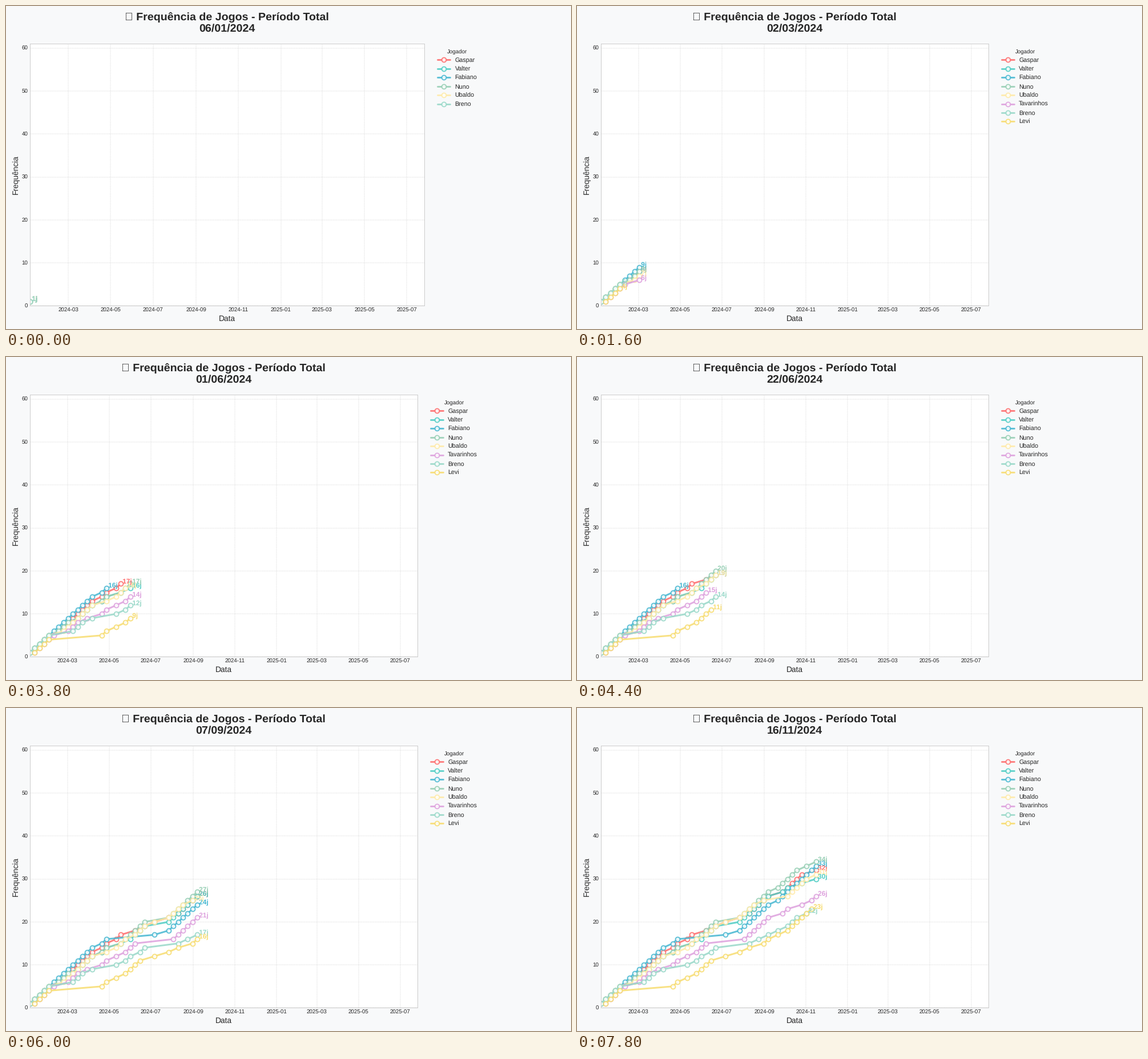
A matplotlib script that plays this animation: 990 by 566 pixels, repeating every 8 s.

```python
import numpy as np
import matplotlib.pyplot as plt
from matplotlib.animation import FuncAnimation

W, H, DPI = 990, 566, 70.71
INK, RULE, PAPER = "0.15", "0.8", "#f8f9fa"

plt.rcParams.update({
    "font.family": ["Liberation Sans"],
    "font.size": 10,
    "text.color": INK,
    "text.hinting": "none",
    "axes.labelcolor": INK,
    "axes.edgecolor": RULE,
    "axes.linewidth": 1,
    "axes.axisbelow": True,
    "xtick.color": INK,
    "ytick.color": INK,
    "xtick.major.size": 0,
    "ytick.major.size": 0,
    "lines.solid_capstyle": "round",
})

# Saturdays with a game, as days since the first one
START = np.datetime64("2024-01-06")
IDLE_WEEKS = {14, 17, 25, 27, 28, 36}
DAYS = np.array([7 * w for w in range(46) if w not in IDLE_WEEKS])
SPAN = 567

# name, colour, sessions missed
PLAYERS = [
    ("Gaspar", "#FF6B6B", [5, 18, 19, 21, 25, 31, 37, 38]),
    ("Valter", "#4ECDC4", [5, 9, 16, 18, 23, 31, 34, 35, 37, 38]),
    ("Fabiano", "#45B7D1", range(16, 23)),
    ("Nuno", "#96CEB4", [5, 9, 16, 23, 36, 38]),
    ("Ubaldo", "#FFEAA7", [5, 6, 14, 19, 28, 30, 31, 32, 38]),
    ("Tavarinhos", "#DDA0DD",
     [0, 6, 7, 11, 13, 17, 21, 22, 23, 24, 31, 34, 35, 37]),
    ("Breno", "#98D8C8",
     [5, 6, 7, 8, 12, 14, 15, 17, 20, 23, 24, 25, 27, 29, 32, 36, 38, 39]),
    ("Levi", "#F7DC6F", [0, *range(5, 14), 17, 22, 25, 27, 28, 32, 39]),
]

fig = plt.figure(figsize=((W + 0.01) / DPI, (H + 0.01) / DPI), dpi=DPI,
                 facecolor=PAPER)
ax = fig.add_axes([0, 0, 1, 1], facecolor="white")


def place(right):
    left, top, bottom = 41.9, 66, 525.5
    ax.set_position([left / W, 1 - bottom / H,
                     (right - left) / W, (bottom - top) / H])


def style_axes():
    months = np.arange("2024-03", "2025-08", 2, dtype="datetime64[M]")
    ticks = (months.astype("datetime64[D]") - START).astype(int)
    ax.set_xticks(ticks, [str(m) for m in months])
    ax.set_yticks(range(0, 61, 10))
    ax.set_xlim(0, SPAN)
    ax.set_ylim(0, 61)
    ax.grid(True, linestyle="--", linewidth=0.5, color=RULE)
    ax.set_xlabel("Data", fontsize=14)
    ax.set_ylabel("Frequência", fontsize=14)


def make_legend(handles):
    return ax.legend(handles=handles, title="Jogador", fontsize=11,
                     title_fontsize=10, loc="upper left", labelspacing=0.48,
                     bbox_to_anchor=(1.02, 1), frameon=False)


style_axes()
title = ax.set_title("", fontsize=20, fontweight="bold", pad=21)

lines, tags, played = [], [], []
for name, color, missed in PLAYERS:
    line, = ax.plot([], [], "o-", color=color, label=name, lw=3, ms=8,
                    mfc="white", mew=2, alpha=0.85)
    lines.append(line)
    tags.append(ax.text(0, 0, "", color=color, fontsize=12,
                        fontweight="bold"))
    played.append(np.array([i for i in range(len(DAYS)) if i not in missed]))

# The axes own only the latest legend, so the earlier one is added back
first_legend = make_legend([l for l, p in zip(lines, played) if p[0] == 0])
full_legend = make_legend(lines)
ax.add_artist(first_legend)


def update(frame):
    opening = frame == 0
    place(732.7 if opening else 720.6)
    first_legend.set_visible(opening)
    full_legend.set_visible(not opening)

    year, month, day = str(START + int(DAYS[frame])).split("-")
    title.set_text("\U0001F4C8 Frequência de Jogos - Período Total\n"
                   f"{day}/{month}/{year}")

    for line, tag, sessions in zip(lines, tags, played):
        x = DAYS[sessions[sessions <= frame]]
        n = len(x)
        line.set_data(x, np.arange(1, n + 1))
        tag.set_visible(n > 0)
        if n:
            tag.set_position((x[-1], n))
            tag.set_text(f" {n}j")
    return [*lines, *tags, title]


anim = FuncAnimation(fig, update, frames=len(DAYS), interval=200,
                     repeat=True, repeat_delay=0, blit=False)
plt.show()
```
